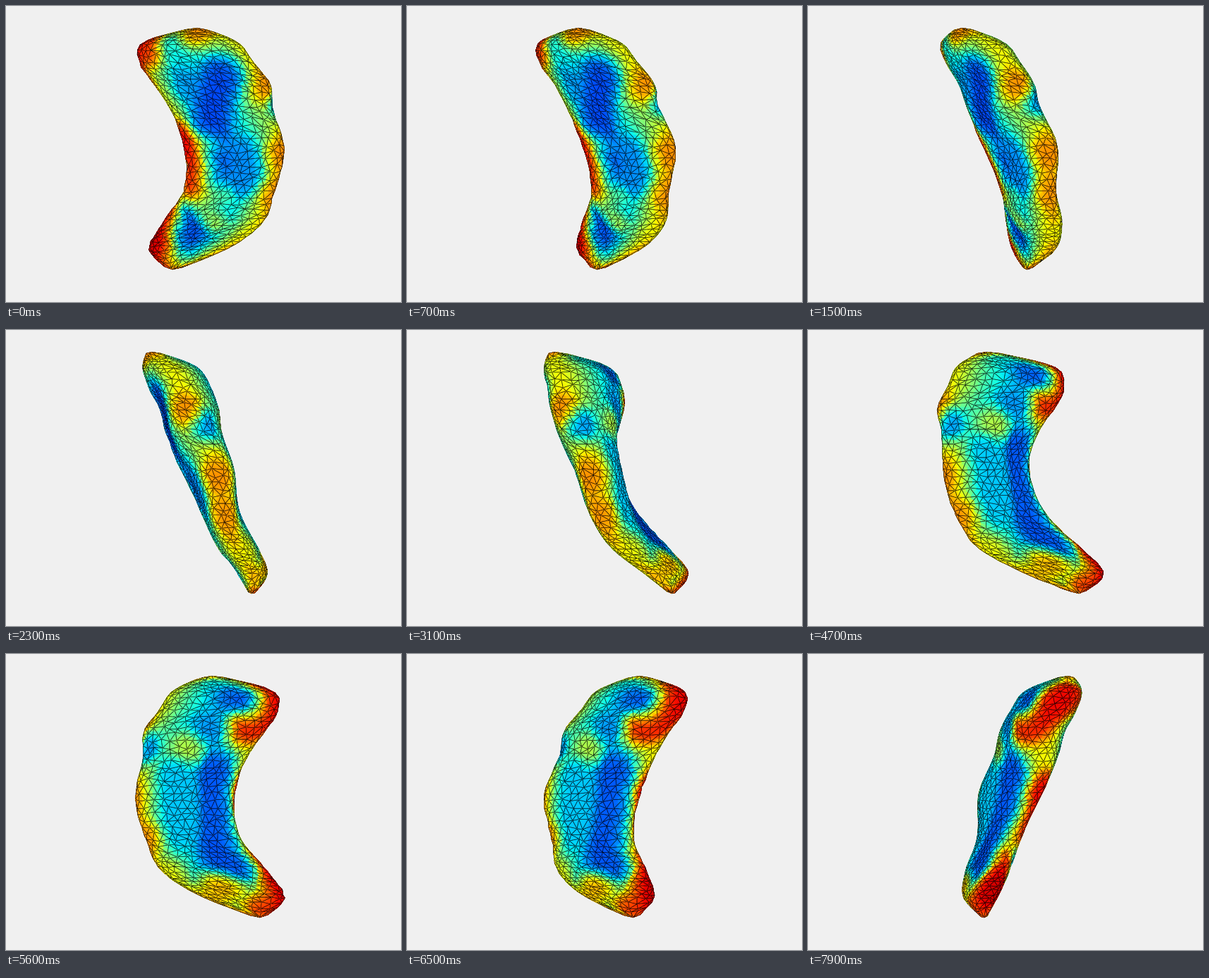
Write a matplotlib script that moves like this. It is 560 px wide and 420 px high and loops after 8000 ms.

```python
import numpy as np
import matplotlib.pyplot as plt
from matplotlib.animation import FuncAnimation
from matplotlib.collections import PolyCollection
from matplotlib.tri import Triangulation

W, H, DPI = 560, 420, 100
FRAMES, STEP = 80, np.radians(3)
AXIS = 290                      # screen x of the turning axis
TOP, BOTTOM = 31.3, 373.8
rng = np.random.default_rng(4)

# The body is a stack of ellipses: height, centre (x, depth), long and short half axis
SPINE = np.array([
    (31, -19, 82, 10, 7), (48, -27, 56, 62, 34), (80, -19, 40, 84, 44),
    (110, 2, 35, 86, 43), (142, 14, 33, 75, 40), (200, 34, 17, 70, 33),
    (265, 25, -8, 68, 27), (312, 1, -43, 74, 28), (348, -34, -77, 54, 20),
    (374, -54, -83, 6, 3),
], float)

# Ridges (warm) and grooves (cool): turning angle, value, path on the screen
FEATURES = [
    (0, .19, [(310, 95), (288, 155), (293, 200), (290, 280), (247, 325)]),
    (0, .26, [(335, 205), (335, 250)]),
    (0, .27, [(260, 112)]),
    (0, .80, [(270, 35)]),
    (0, .86, [(190, 64)]),
    (69, .77, [(255, 110)]),
    (69, .77, [(297, 202)]),
    (69, .76, [(312, 262)]),
    (69, .24, [(288, 132)]),
    (69, .64, [(345, 318)]),
    (117, .74, [(370, 332)]),
    (117, .90, [(402, 362)]),
    (195, .04, [(339, 81)]),
    (195, .22, [(318, 57)]),
    (195, .26, [(285, 105)]),
    (195, .20, [(297, 162), (290, 235), (275, 285), (303, 306)]),
    (195, .32, [(240, 165), (240, 245)]),
    (195, .60, [(262, 135)]),
    (195, .74, [(265, 330)]),
    (237, .92, [(372, 52), (345, 72), (308, 100)]),
    (237, .94, [(332, 190), (303, 262), (286, 300), (255, 350)]),
]


def turn(p, a):
    """Screen x and depth towards the viewer after turning by a."""
    c, s = np.cos(a), np.sin(a)
    return AXIS + p[..., 0] * c - p[..., 1] * s, p[..., 0] * s + p[..., 1] * c


def spline(y):
    """Smooth Hermite curve through the spine."""
    ky, kv = SPINE[:, 0], SPINE[:, 1:]
    slope = np.gradient(kv, ky, axis=0)
    i = np.clip(np.searchsorted(ky, y) - 1, 0, len(ky) - 2)
    gap = (ky[i + 1] - ky[i])[:, None]
    t = (y - ky[i])[:, None] / gap
    rise = t * t * (3 - 2 * t)
    bend = t * (1 - t) * ((1 - t) * slope[i] - t * slope[i + 1]) * gap
    return kv[i] + rise * (kv[i + 1] - kv[i]) + bend


def surface(rows=360, cols=240):
    """Dense skin, each row spaced evenly along its own girth."""
    t = np.linspace(0, 2 * np.pi, cols + 1)
    ys = np.linspace(TOP, BOTTOM, rows)
    skin, mids, ratio, girth = [], [], [], []
    for y, (cx, cd, a, b) in zip(ys, spline(ys)):
        tilt = -np.radians(158 + 18 * np.exp(-((y - 190) / 55) ** 2))
        c, s = np.cos(tilt), np.sin(tilt)
        u, v = max(a, 3) * np.cos(t), max(b, 2) * np.sin(t)
        x, d, r = cx + u * c - v * s, cd + u * s + v * c, np.hypot(u, v)
        arc = np.r_[0, np.cumsum(np.hypot(np.diff(x), np.diff(d)))]
        even = np.linspace(0, arc[-1], cols, endpoint=False)
        skin.append(np.column_stack([np.interp(even, arc, x), np.interp(even, arc, d),
                                     np.full(cols, y)]))
        mids.append((cx, cd, y))
        ratio.append(np.interp(even, arc, r / r.mean()))
        girth.append(arc[-1])
    return np.array(skin), np.array(mids), np.array(ratio), np.array(girth)


def build_mesh(row_gap=10.5, gap=12.5):
    skin, mids, ratio, girth = surface()
    rows, cols = ratio.shape
    gaps = np.linalg.norm(np.diff(skin, axis=0), axis=2).mean(1)
    along = np.r_[0, np.cumsum(gaps)]
    total = along[-1]
    count = int(round(total / row_gap))
    us, ss = [], []
    for j in range(count):
        s = (j + .5) / count * total
        n = max(5, int(round(np.interp(s, along, girth) / gap)))
        us.append((np.arange(n) + j % 2 / 2 + rng.uniform(-.24, .24, n)) / n % 1)
        ss.append(s + rng.uniform(-.28, .28, n) * total / count)
    u, s = np.concatenate(us), np.concatenate(ss)
    k = np.clip(np.searchsorted(along, s), 0, rows - 1)
    m = (u * cols).astype(int) % cols
    pts = np.vstack([skin[k, m], mids[0], mids[-1]])
    core = np.vstack([mids[k], mids[0], mids[-1]])
    base = np.r_[ratio[k, m], 1, 1]

    # Delaunay on the unrolled skin, with copies left and right and a pole row at each end
    n = len(u)
    pole = np.arange(-1, 2.01, .125) + .013
    uu = np.r_[u - 1, u, u + 1, pole, pole]
    vv = np.r_[s, s, s, pole * 0 - 7, pole * 0 + total + 7]
    ids = np.r_[np.tile(np.arange(n), 3), np.full(len(pole), n), np.full(len(pole), n + 1)]
    tri = Triangulation(uu * 300, vv).triangles
    mid = uu[tri].mean(1)
    tri = tri[(mid >= 0) & (mid < 1)]
    a, b, c = np.moveaxis(np.stack([uu[tri], vv[tri]], -1), 1, 0)
    flip = (b - a)[:, 0] * (c - a)[:, 1] < (b - a)[:, 1] * (c - a)[:, 0]
    tri[flip] = tri[flip][:, ::-1]
    tri = ids[tri]
    i, j, k = tri.T
    return pts, core, base, tri[(i != j) & (j != k) & (k != i)]


def walk(path, step=9):
    """Points at even steps along a path."""
    path = np.array(path, float)
    arc = np.r_[0, np.cumsum(np.hypot(*np.diff(path, axis=0).T))]
    at = np.linspace(0, arc[-1], int(arc[-1] / step) + 1)
    return zip(np.interp(at, arc, path[:, 0]), np.interp(at, arc, path[:, 1]))


def paint(pts, core, base, size=12):
    """Value per vertex: warm far from the core, pulled to ridges and grooves."""
    weight = np.full(len(pts), .12)
    total = weight * np.clip(.5 + .55 * (base - 1), .36, .72)
    for deg, value, path in FEATURES:
        a = np.radians(deg)
        x, depth = turn(pts, a)
        back = depth < turn(core, a)[1]
        for px, py in walk(path):
            near = np.argmin((x - px) ** 2 + (pts[:, 2] - py) ** 2 + 1e6 * back)
            w = np.exp(-((pts - pts[near]) ** 2).sum(1) / (2 * size ** 2))
            total += w * value
            weight += w
    return total / weight


pts, core, base, tri = build_mesh()
value = paint(pts, core, base)

# Warm regions swell, cool ones are hollows
out = pts - core
out /= np.maximum(np.linalg.norm(out, axis=1, keepdims=True), 1e-6)
swell = 12 * np.maximum(value - .72, 0) - 50 * np.maximum(.32 - value, 0)
pts = pts + out * swell[:, None]

# Per face: whole triangle, three corner pieces, clear outline
v = value[tri]
mean = v.mean(1, keepdims=True)
shade = plt.cm.jet(np.hstack([mean, v / 2 + mean / 2]))
shade = np.concatenate([shade, np.zeros((len(tri), 1, 4))], axis=1)

fig = plt.figure(figsize=(W / DPI, H / DPI), dpi=DPI, facecolor="#f0f0f0")
ax = fig.add_axes([0, 0, 1, 1])
ax.set(xlim=(0, W), ylim=(H, 0))
ax.axis("off")
body = PolyCollection([], edgecolors=["none"] * 4 + ["black"],
                      linewidths=[0, 0, 0, 0, .5],
                      antialiaseds=[False] * 4 + [True])
ax.add_collection(body, autolim=False)


def draw(i):
    x, depth = turn(pts, i * STEP)
    p = np.column_stack([x, pts[:, 2]])[tri]
    e, f = p[:, 1] - p[:, 0], p[:, 2] - p[:, 0]
    front = np.flatnonzero(e[:, 0] * f[:, 1] < e[:, 1] * f[:, 0])
    front = front[np.argsort(depth[tri[front]].mean(1))]
    p = p[front]
    corners = [np.stack([p[:, k], (p[:, k] + p[:, k - 1]) / 2, (p[:, k] + p[:, k - 2]) / 2], 1)
               for k in range(3)]
    body.set_verts(np.stack([p, *corners, p], 1).reshape(-1, 3, 2))
    body.set_facecolor(shade[front].reshape(-1, 4))
    return body,


anim = FuncAnimation(fig, draw, frames=FRAMES, interval=100, repeat=True,
                     repeat_delay=0, init_func=lambda: draw(0))
plt.show()
```
